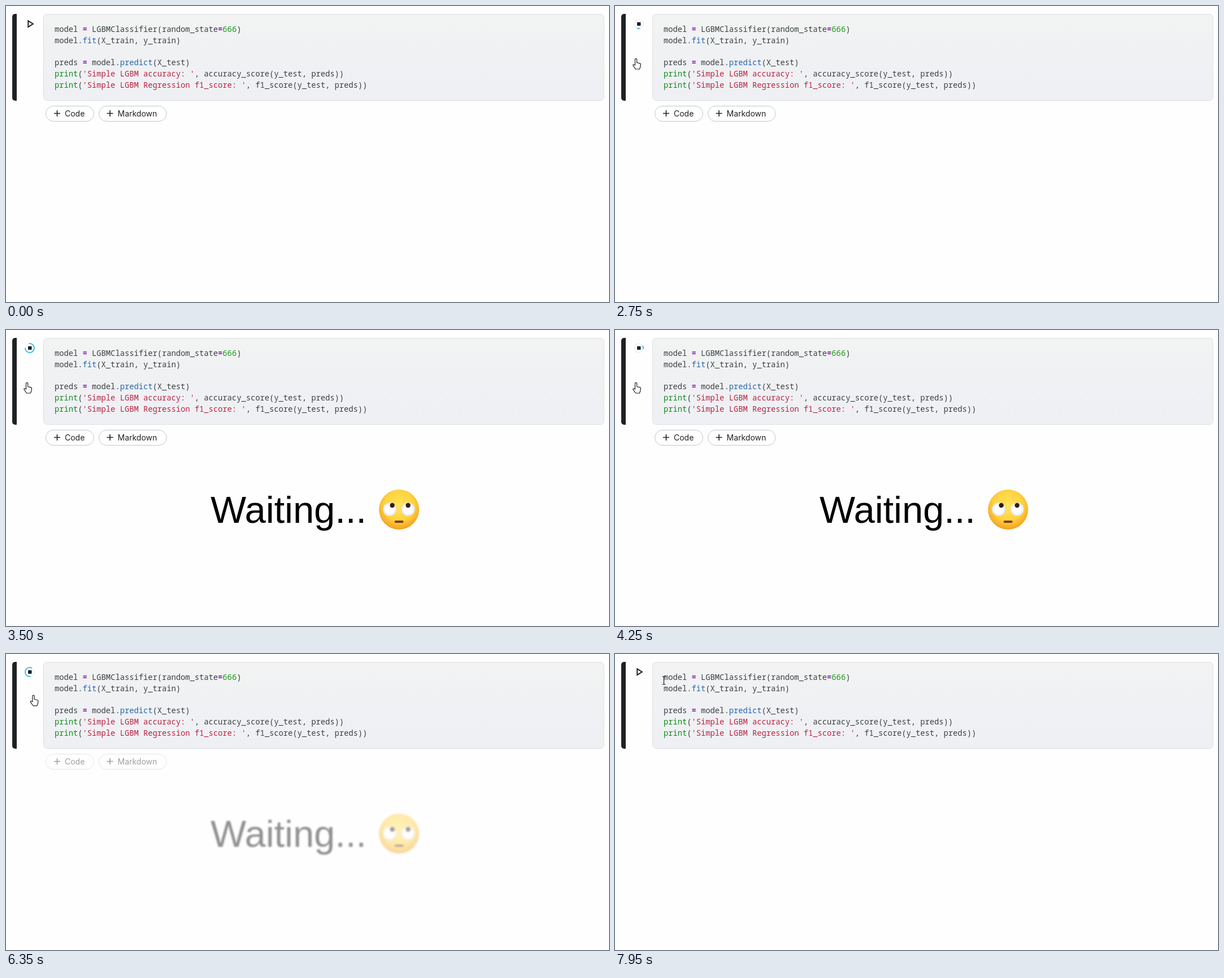
These frames come from a looping animation (1067 px wide and 525 px high, 8 s). An HTML page:

```html
<!DOCTYPE html>
<html lang="en">
<head>
<meta charset="utf-8">
<title>Notebook cell</title>
<style>
html, body { margin: 0; width: 100%; height: 100%; overflow: hidden; background: #fefefe; }
svg { display: block; }
.code text { font: 13.78px "Noto Sans Mono", "Liberation Mono", monospace; fill: #3c4043; white-space: pre; }
.code .op { fill: #8a1fb0; font-weight: 700; }
.code .num { fill: #1c9a1c; }
.code .fn { fill: #2467ae; }
.code .key { fill: #128a1c; }
.code .str { fill: #b92441; }
.button rect { fill: #fff; stroke: #c4c6ca; }
.button path { stroke: #202124; stroke-width: 1.6; }
.button text { font: 14px Inter, sans-serif; fill: #202124; }
.waiting text { font: 66.8px "Liberation Sans", Arial, sans-serif; }
</style>
</head>
<body>
<svg width="1067" height="525" viewBox="0 0 1067 525">
  <defs>
    <linearGradient id="cell" x2="0" y2="1">
      <stop offset="0" stop-color="#f2f3f2"/><stop offset=".4" stop-color="#f0f1f3"/><stop offset="1" stop-color="#eff0f4"/>
    </linearGradient>
    <radialGradient id="face" cx=".5" cy=".4" r=".62">
      <stop offset="0" stop-color="#ffe65c"/><stop offset=".6" stop-color="#ffd23f"/><stop offset="1" stop-color="#f39a1d"/>
    </radialGradient>
    <radialGradient id="eye">
      <stop offset=".6" stop-color="#fff"/><stop offset="1" stop-color="#dfe3e8"/>
    </radialGradient>
  </defs>

  <g id="page">
    <path d="M19 14h-3a5 5 0 0 0-5 5v144a5 5 0 0 0 5 5h3z" fill="#202124"/>
    <rect x="66.5" y="14.5" width="991.5" height="153" rx="6" fill="url(#cell)" stroke="#dddfe3"/>
    <g class="code" id="code"></g>
    <path id="play" d="M39.3 26.3v10.9l8.5-5.45z" fill="none" stroke="#202124" stroke-width="2"/>
    <g id="spinner">
      <circle cx="42" cy="32" r="8" fill="#fff" stroke="#eceef0" stroke-width="1.5"/>
      <rect x="39" y="28.8" width="6.5" height="6.2" fill="#202124"/>
      <circle id="arc" cx="42" cy="32" r="8" pathLength="360" fill="none" stroke="#3dbfe0" stroke-width="2"/>
    </g>
    <g id="buttons">
      <g class="button">
        <rect x="70.5" y="177.5" width="85" height="27" rx="13.5"/>
        <path d="M85 190.5h11M90.5 185v11"/>
        <text x="104" y="195.5">Code</text>
      </g>
      <g class="button">
        <rect x="164.5" y="177.5" width="119.5" height="27" rx="13.5"/>
        <path d="M178.5 190.5h11M184 185v11"/>
        <text x="197.5" y="195.5">Markdown</text>
      </g>
    </g>
  </g>

  <g class="waiting" id="waiting">
    <text x="362" y="342">Waiting...</text>
    <circle cx="695.5" cy="318.5" r="35.5" fill="url(#face)"/>
    <g fill="url(#eye)"><circle cx="679" cy="318" r="12"/><circle cx="711.5" cy="318" r="12"/></g>
    <g fill="#2f1d14"><circle cx="683.5" cy="311" r="4.2"/><circle cx="711.5" cy="311" r="4.2"/></g>
    <rect x="687.5" y="338" width="16" height="4" rx="2" fill="#7a3f10"/>
  </g>

  <path id="hand" fill="#fff" stroke="#202124" stroke-width="1.2" stroke-linejoin="round"
    d="M-2.5 3V-7a1.6 1.6 0 0 1 3.2 0V-1.5l5 1.2q2 .5 1.8 2.5L6.7 6.5 5.3 10H-1.5L-5.8 3.8q-1-2 .8-2z"/>
  <path id="beam" fill="none" stroke="#202124" stroke-width="1.2" d="M-3-7h2l1 1 1-1h2M0-6V6M-3 7h2l1-1 1 1h2"/>
</svg>
<script>
const LOOP = 8000;
const $ = id => document.getElementById(id);
const clamp = v => Math.min(1, Math.max(0, v));
const ramp = (t, a, b) => clamp((t - a) / (b - a));
const span = (kind, text) => `<tspan class="${kind}">${text}</tspan>`;
const show = (id, on) => $(id).setAttribute('visibility', on ? 'visible' : 'hidden');

const eq = span('op', '=');
const lines = [
  `model ${eq} LGBMClassifier(random_state${eq}${span('num', '666')})`,
  `model.${span('fn', 'fit')}(X_train, y_train)`,
  '',
  `preds ${eq} model.${span('fn', 'predict')}(X_test)`,
  `${span('key', 'print')}(${span('str', "'Simple LGBM accuracy: '")}, accuracy_score(y_test, preds))`,
  `${span('key', 'print')}(${span('str', "'Simple LGBM Regression f1_score: '")}, f1_score(y_test, preds))`
];
$('code').innerHTML = lines.map((s, i) => `<text x="86" y="${46 + i * 19.7}">${s}</text>`).join('');

// cubic-bezier(.4, 0, .2, 1)
function ease(x) {
  let lo = 0, hi = 1;
  for (let i = 0; i < 20; i++) {
    const s = (lo + hi) / 2, r = 1 - s;
    if (1.2 * r * r * s + 0.6 * r * s * s + s * s * s < x) lo = s; else hi = s;
  }
  return lo * lo * (3 - 2 * lo);
}

// Pointer stops: time, x, y
const handPath = [[1700, 38, 150], [2050, 43, 40], [2250, 43, 40], [2500, 38, 102],
                  [6200, 38, 102], [6450, 51, 79], [7300, 51, 79], [7700, 66, 84]];
const beamPath = [[7700, 100, 92], [7900, 86.5, 47], [LOOP, 86.5, 47]];

function follow(id, path, t) {
  const i = path.findIndex(p => p[0] > t);
  show(id, i > 0);
  if (i < 1) return;
  const [t0, x0, y0] = path[i - 1], [t1, x1, y1] = path[i];
  const k = ease(ramp(t, t0, t1));
  $(id).setAttribute('transform', `translate(${x0 + (x1 - x0) * k} ${y0 + (y1 - y0) * k})`);
}

// The arc grows and shrinks in turn while its centre turns steadily and in eased steps
function spin(t) {
  const n = (t - 2847) / 666.5, step = Math.floor(n), e = ease(n - step);
  const size = 35 + 245 * (step & 1 ? 1 - e : e);
  const centre = 93 + 360 * (t - 2750) / 1568 + 135 * (step + e);
  $('arc').setAttribute('stroke-dasharray', `${size} 360`);
  $('arc').setAttribute('transform', `rotate(${centre - size / 2} 42 32)`);
}

function draw(t) {
  const running = t >= 2600 && t < 7600;
  show('play', !running);
  show('spinner', running);
  spin(t);

  const out = ramp(t, 6150, 6500);
  const fade = ramp(t, 2900, 3350) * (1 - out);
  $('waiting').style.opacity = fade;
  $('waiting').style.filter = fade > 0 && fade < 1 ? `blur(${3 * (1 - fade)}px)` : 'none';
  $('buttons').style.opacity = 1 - out;
  $('page').setAttribute('transform', `translate(${t >= 3000 && t < 3400 ? -1 : 0} 0)`);

  follow('hand', handPath, t);
  follow('beam', beamPath, t);
}

const start = performance.now();
function tick() {
  draw((performance.now() - start) % LOOP);
  requestAnimationFrame(tick);
}
tick();
</script>
</body>
</html>
```
